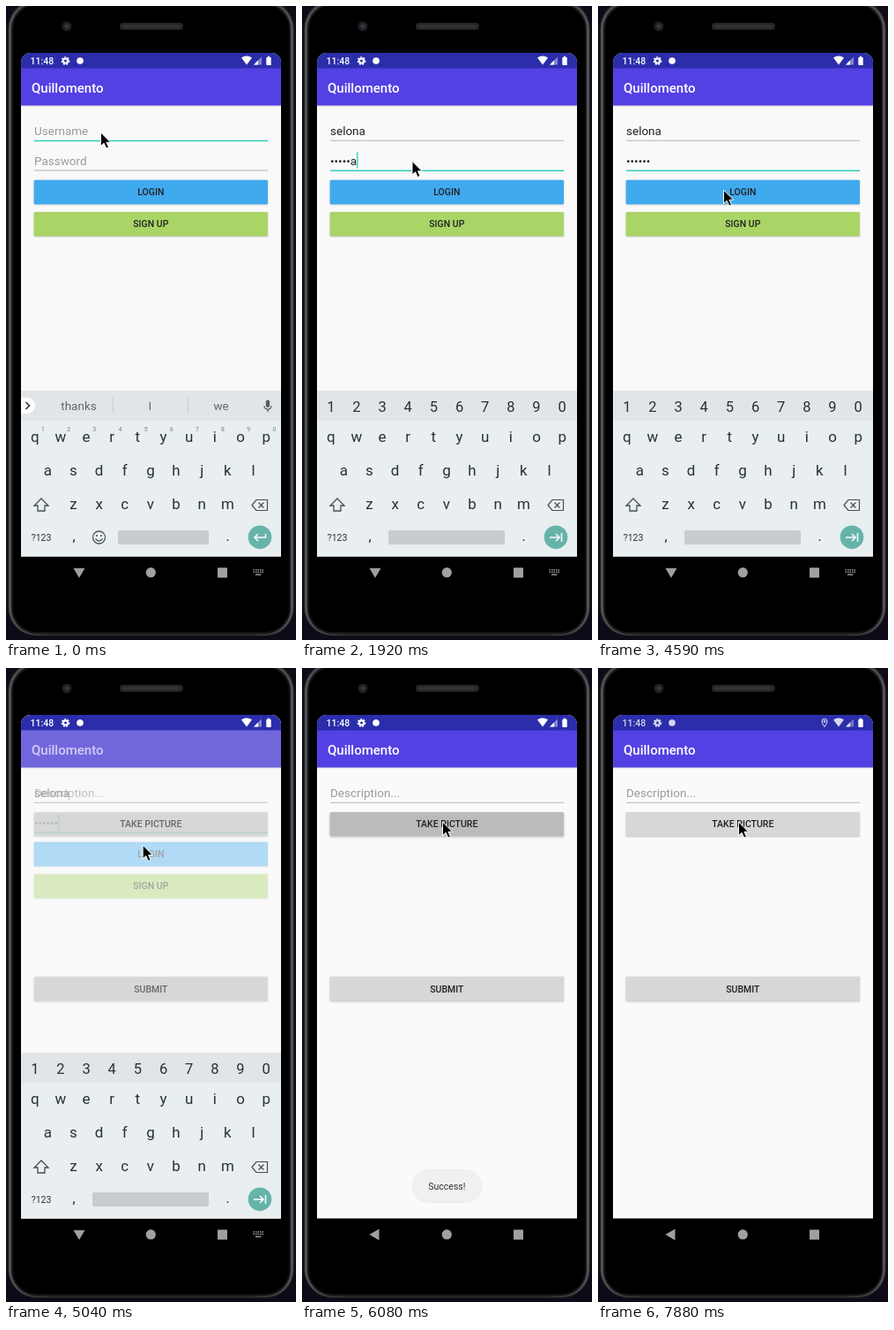
An HTML page with a canvas that plays this animation: 329x717 px, repeating every 8 s.

```html
<!DOCTYPE html>
<html lang="en">
<head>
<meta charset="utf-8">
<title>Login demo</title>
<style>
  html, body { margin: 0; width: 100%; height: 100%; overflow: hidden; background: #0d0b17; }
  canvas { display: block; }
</style>
</head>
<body>
<canvas id="stage" width="329" height="717"></canvas>
<script>
const g = document.getElementById('stage').getContext('2d');
const LOOP = 8000, TICK = 148.6;
const APP = 'Quillomento', USER = 'selona';
const INK = '#263238', GREY = '#9b9b9b', TEAL = '#2fcdbb';

function rect(x, y, w, h, fill, r = 0) {
  g.fillStyle = fill;
  g.beginPath();
  g.roundRect(x, y, w, h, r);
  g.fill();
}
function disc(x, y, r, fill) {
  g.fillStyle = fill;
  g.beginPath();
  g.arc(x, y, r, 0, 7);
  g.fill();
}
function shape(d, x, y, fill, stroke, width = 1) {
  const p = new Path2D(d);
  g.save();
  g.translate(x, y);
  if (fill) { g.fillStyle = fill; g.fill(p); }
  if (stroke) { g.strokeStyle = stroke; g.lineWidth = width; g.stroke(p); }
  g.restore();
}
function text(s, x, y, size, fill, weight = 400, align = 'left') {
  g.font = `${weight} ${size}px Roboto, sans-serif`;
  g.textAlign = align;
  g.fillStyle = fill;
  g.fillText(s, x, y);
}
function faded(alpha, draw, dy = 0) {
  if (alpha <= 0) return;
  g.save();
  g.globalAlpha *= alpha;
  g.translate(0, dy);
  draw();
  g.restore();
}
// Linear interpolation through [tick, ...values] stops.
function along(stops, k) {
  if (k <= stops[0][0]) return stops[0].slice(1);
  for (let i = 1; i < stops.length; i++) {
    const a = stops[i - 1], b = stops[i];
    if (k <= b[0]) {
      const f = (k - a[0]) / (b[0] - a[0]);
      return a.slice(1).map((v, j) => v + (b[j + 1] - v) * f);
    }
  }
  return stops.at(-1).slice(1);
}
// Value of the last [tick, value] stop reached.
const held = (stops, k) => stops.reduce((v, s) => k >= s[0] ? s[1] : v, 0);

function phone() {
  rect(0, 0, 329, 717, '#0d0b17');
  const rim = g.createLinearGradient(0, 0, 329, 0);
  rim.addColorStop(0, '#54575a');
  rim.addColorStop(.15, '#26282a');
  rim.addColorStop(.85, '#26282a');
  rim.addColorStop(1, '#54575a');
  rect(1, -8, 327, 721, '#141517', 34);
  rect(3, -6, 323, 718, rim, 32);
  rect(6, -3, 317, 713, '#151618', 29);
  rect(8, -1, 313, 709, '#000', 27);
  rect(129, 19, 72, 8, '#242527', 4);
  rect(132, 21, 66, 4, '#303133', 2);
  disc(69, 23, 5.5, '#1d2023');
  disc(69, 23, 2.5, '#34393f');
}

function statusBar(k) {
  rect(17, 53, 295, 17.5, '#2b2dab');
  const dim = held([[0, 1], [51, .95], [52, .88], [53, .8]], k);
  faded(dim, () => {
    text('11:48', 27.5, 66, 10.5, '#fff', 500);
    g.setLineDash([2, 1.4]);
    shape('M4 0A4 4 0 1 1 -4 0A4 4 0 1 1 4 0', 67.5, 62, null, '#fff', 1.6);
    g.setLineDash([]);
    shape('M2.5 0A2.5 2.5 0 1 1 -2.5 0A2.5 2.5 0 1 1 2.5 0', 67.5, 62, null, '#fff', 2);
    disc(84, 62, 3.8, '#fff');
    shape('M-6 -3Q0 -7 6 -3L0 5Z', 273, 61.5, '#fff');
    shape('M0 9H9V0Z', 281, 57.5, '#8587d2');
    shape('M0 9H5V4Z', 281, 57.5, '#fff');
  });
  rect(295.3, 58, 5.4, 9, '#fff', .7);
  rect(296.8, 56.8, 2.4, 2, '#fff');
  faded(held([[51, .4], [52, .7], [53, .9]], k), () =>
    shape('M0 4.5Q-3 1 -3 -1.5A3 3 0 0 1 3 -1.5Q3 1 0 4.5ZM1 -1.5A1 1 0 1 0 -1 -1.5A1 1 0 1 0 1 -1.5',
      257, 62, null, '#fff'));
}

function appBar() {
  g.save();
  g.shadowColor = 'rgba(0,0,0,.18)';
  g.shadowBlur = 2;
  g.shadowOffsetY = .5;
  rect(17, 70, 295, 42.5, '#5341e3');
  g.restore();
  text(APP, 29, 97.6, 15, '#fff', 500);
}

function button(label, y, h, fill, press = 0) {
  g.save();
  g.shadowColor = 'rgba(0,0,0,.22)';
  g.shadowBlur = 2 + press;
  g.shadowOffsetY = .6 + press * .5;
  rect(31.7, y, 265.3, h, fill, 1.5);
  g.restore();
  if (press) rect(31.7, y, 265.3, h, `rgba(0,0,0,${press * .13})`, 1.5);
  text(label, 164.3, y + h / 2 + 3.8, 10.5, '#202122', 500, 'center');
}

function field(value, hint, y, focused, caret) {
  text(value || hint, 32, y, 13.5, value ? '#222' : GREY);
  if (caret) rect(32 + (value ? g.measureText(value).width : 0), y - 14.5, 1.3, 18.5, TEAL);
  rect(32, y + 5.7, 265, focused ? 1.5 : 1, focused ? TEAL : '#b4b4b4');
}

function loginScreen(k, typed) {
  rect(17, 53, 295, 570, '#f9f9f9');
  const onPassword = k >= 7;
  field(typed, 'Username', 146, !onPassword, k >= 2 && !onPassword);
  const count = held([[9, 2], [10, 3], [11, 5], [12, 6]], k);
  const password = k >= 22 || !count ? '•'.repeat(count) : '•'.repeat(count - 1) + USER[count - 1];
  const caret = held([[7, 1], [16, 0], [19, 1], [22, 0], [26, 1], [31, 0], [33, 1]], k);
  field(password, 'Password', 179.7, onPassword, caret);
  const press = held([[15, .3], [16, .6], [17, .8], [18, .9], [19, 1], [20, 0]], k);
  button('LOGIN', 196.7, 27.5, '#40aaee', press * .8);
  button('SIGN UP', 233, 27.3, '#a9d466');
  appBar();
}

function postScreen(k) {
  rect(17, 53, 295, 570, '#fafafa');
  field('', 'Description...', 146, false, false);
  const press = held([[41, 1], [43, .6], [44, .25], [45, 0]], k);
  button('TAKE PICTURE', 163, 27.3, '#d6d8d7', press);
  button('SUBMIT', 349, 27.8, '#d6d8d7');
  appBar();
}

function keyRow(keys, x, y, size = 17) {
  [...keys].forEach((c, i) => text(c, x + i * 29.15, y, size, INK, 400, 'center'));
}

function keyboard(secret, typed) {
  rect(17, 435, 295, 188, '#e9eef1');
  rect(17, 435, 295, 34, '#e1e5e8');
  if (secret) {
    keyRow('1234567890', 32.8, 459, 16.5);
  } else {
    const cap = typed && typed[0].toUpperCase() + typed.slice(1);
    const words = typed ? [typed, cap, cap + 'n'] : ['thanks', 'I', 'we'];
    words.forEach((w, i) => {
      const bold = typed && i === 1;
      text(w, 82.5 + i * 80.8, 457.3, 13.5, bold ? '#111' : '#60676b', bold ? 700 : 400, 'center');
    });
    rect(121, 443, 1, 18, '#c8cdd0');
    rect(206, 443, 1, 18, '#c8cdd0');
    rect(17, 443, 16, 18, '#fff', [0, 9, 9, 0]);
    shape('M-2 -4L2 0L-2 4', 24.5, 452, null, '#333', 1.6);
    rect(294.8, 445.5, 4.4, 8.5, '#555c60', 2.2);
    shape('M-4.2 0A4.2 4.2 0 0 0 4.2 0M0 4V7', 297, 452, null, '#555c60', 1.2);
    [...'1234567890'].forEach((c, i) => text(c, 42 + i * 29.15, 481, 7, '#777e82', 400, 'center'));
  }
  keyRow('qwertyuiop', 32.8, 493);
  keyRow('asdfghjkl', 47.3, 531);
  keyRow('zxcvbnm', 76.5, 569);
  shape('M0 -7L8 1H4V7H-4V1H-8Z', 40, 564, null, '#444d52', 1.3);
  shape('M-9 0L-4 -6H8.5V6H-4ZM-1.5 -3L4.5 3M4.5 -3L-1.5 3', 288, 564.5, null, '#444d52', 1.2);
  text('?123', 40, 605, 10.5, INK, 400, 'center');
  text(',', 77, 605, 16, INK, 400, 'center');
  text('.', 251.5, 605, 16, INK, 400, 'center');
  if (!secret) {
    shape('M7 0A7 7 0 1 1 -7 0A7 7 0 1 1 7 0M-4 1.5Q0 6.5 4 1.5', 105.5, 601, null, '#505a5f', 1.3);
    disc(103, 599, 1.1, '#505a5f');
    disc(108, 599, 1.1, '#505a5f');
  }
  const left = secret ? 98 : 127;
  rect(left, 593, 230 - left, 16, '#c8cccf', 1.5);
  disc(288, 600.7, 13.3, '#66b3a9');
  shape(secret ? 'M-7 0H4M0 -4L4 0L0 4M6.5 -5V5' : 'M6.5 -4V0H-6M-2 -4L-6 0L-2 4',
    288, 601, null, '#fff', 1.5);
}

function navBar(typing) {
  shape(typing ? 'M-6.5 -5H6.5L0 6Z' : 'M5 -6.5V6.5L-6 0Z', typing ? 83 : 82.5, 640.7, '#a0a0a0');
  disc(164.3, 640.7, 5.6, '#a0a0a0');
  rect(240, 635.2, 11, 11.3, '#a0a0a0', .6);
  if (!typing) return;
  for (let i = 0; i < 10; i++) rect(280.5 + i % 5 * 2.5, 637 + (i > 4) * 2.5, 1.5, 1.5, '#999');
  rect(283, 642.3, 6.5, 1.5, '#999');
}

function toast() {
  g.save();
  g.shadowColor = 'rgba(0,0,0,.1)';
  g.shadowBlur = 1;
  rect(125, 567.5, 79, 37, '#f0f0f0', 18.5);
  g.restore();
  text('Success!', 164.4, 590.3, 10.5, '#333', 400, 'center');
}

function pointer(k) {
  const [x, y] = along([[12, 107, 142], [14, 142, 207], [33, 142, 207],
    [36, 180, 184], [37, 180, 183], [40, 159, 173]], k);
  shape('M0 0V15.5L3.6 12.2L6.2 18L9 16.8L6.5 11.2H11.2Z', x + .5, y + 1, '#000', '#fff', 1);
}

function draw(t) {
  const k = Math.floor((t + 20) / TICK);
  const typed = USER.slice(0, held([[2, 1], [3, 3], [4, 4], [5, 6]], k));
  phone();
  g.save();
  g.beginPath();
  g.roundRect(17, 53, 295, 569.5, [11, 11, 0, 0]);
  g.clip();
  if (k < 35) loginScreen(k, typed);
  faded(held([[34, .6], [35, 1]], k), () => postScreen(k));
  statusBar(k);
  faded(held([[0, 1], [37, .8], [38, .35], [39, 0]], k), () => keyboard(k >= 8, typed),
    held([[37, 45], [38, 130]], k));
  faded(held([[35, .5], [36, 1], [45, .75], [46, .35], [47, 0]], k), toast);
  g.restore();
  navBar(k < 35);
  pointer(k);
}

function loop(now) {
  draw(now % LOOP);
  requestAnimationFrame(loop);
}
requestAnimationFrame(loop);
</script>
</body>
</html>
```
